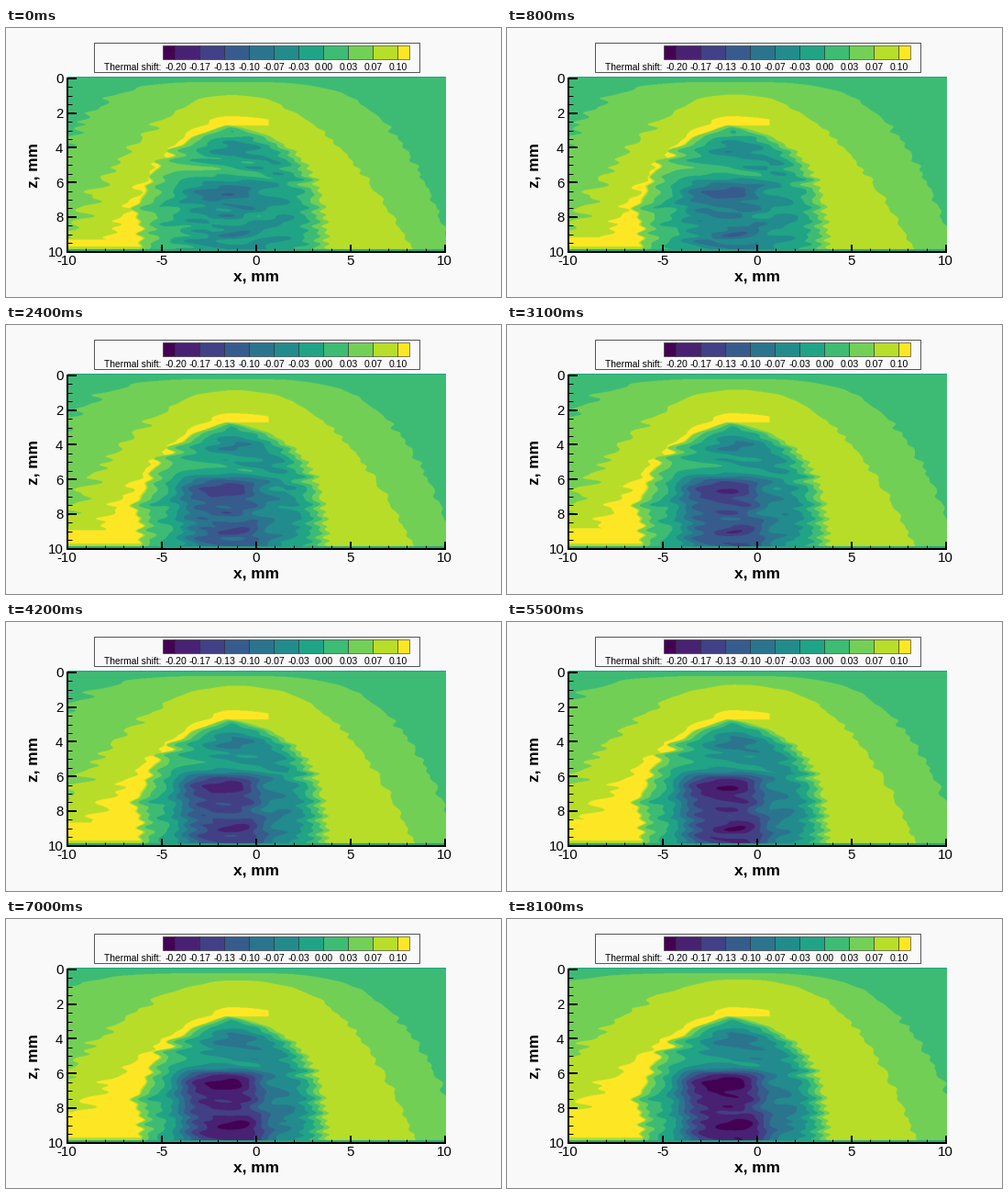
Recreate the animation shown at these times as a matplotlib script. Size 540 by 293 pixels, loop 8.2 s.

```python
import numpy as np
import matplotlib.pyplot as plt
from matplotlib.animation import FuncAnimation
from matplotlib.patches import Rectangle

W, H, DPI = 540, 293, 100
FRAMES, INTERVAL = 82, 100
LEFT, RIGHT, TOP, BOTTOM = 66.5, 479.5, 54, 243.5
PAPER = "#f9f9f9"
LEVELS = np.linspace(-0.2, 0.1, 10)
shade = np.linspace(0, 1, 11)
COLORS = plt.get_cmap("viridis")(shade - 0.07 * shade * (1 - shade))[:, :3]

plt.rcParams["font.family"] = "Liberation Sans"
fig = plt.figure(figsize=(W / DPI, H / DPI), dpi=DPI, facecolor=PAPER)
ax = fig.add_axes([0, 0, 1, 1])

X, Y = np.meshgrid(np.arange(LEFT, RIGHT, 0.5) + 0.25,
                   np.arange(TOP, BOTTOM, 0.5) + 0.25)
rng = np.random.default_rng(11)


def streaks(modes, long_wave, short_wave):
    """Smooth noise, drawn out along x, with unit variance."""
    total = np.zeros_like(X)
    for _ in range(modes):
        kx = 2 * np.pi / rng.uniform(*long_wave) * rng.choice([-1, 1])
        ky = 2 * np.pi / rng.uniform(*short_wave)
        total += np.cos(kx * X + ky * Y + rng.uniform(0, 2 * np.pi))
    return total * np.sqrt(2 / modes)


def bump(cx, cy, sx, sy):
    return np.exp(-((X - cx) / sx) ** 2 / 2 - ((Y - cy) / sy) ** 2 / 2)


def mix(a, b, u):
    return a + (b - a) * u


# Warm bands lie below arches whose sides follow power laws.
side = np.interp(X, [66, 150, 200, 479], [7, 4, 2, 1.6])
bent_x = X + side * streaks(14, (90, 260), (8, 22))


def arch(center, top, left, right):
    """Each side is (drop at 200 px from the center, exponent)."""
    reach = np.abs(bent_x - center) / 200
    return top + np.where(bent_x < center, left[0] * reach ** left[1],
                          right[0] * reach ** right[1])


# Cold core: saturating half widths, depth growing inwards from the rim.
below = np.clip(Y - 107, 0, None)
rim_jitter = 3.2 * streaks(10, (150, 400), (7, 16)) * np.clip(below / 35, 0, 1)
half_left = 94 * (1 - np.exp(-below / 28)) + 10 * np.exp(-((Y - 198) / 10) ** 2)
half_right = 112 * (1 - np.exp(-below / 36)) ** 0.7
core_left = 240 - half_left + rim_jitter
core_right = 240 + half_right + rim_jitter
inset = np.minimum(X - core_left, core_right - X)
in_core = (inset > 0) & (below > 0)
falloff = 1 - np.exp(-np.clip(inset, 0, None) / 20)

block_x = X - 233 - 0.12 * (Y - 200)
block = np.exp(-(block_x / 46) ** 4) / (1 + np.exp(-(Y - 167) / 2))
# Shape, strength at the start, strength at the end.
PARTS = [
    (np.ones_like(X), 0.07, 0.10),
    (bump(255, 132, 32, 10), 0.055, 0.06),
    (bump(297, 150, 18, 10), 0.04, 0.04),
    (bump(215, 156, 38, 6), -0.035, -0.005),
    (bump(240, 181, 33, 11), 0.055, 0.05),
    (bump(260, 228, 27, 9), 0.02, 0.05),
    (bump(312, 205, 24, 28), 0.04, 0.06),
    (block, 0.03, 0.14),
]
texture = 0.01 * streaks(16, (50, 150), (9, 26))
depth_start = sum(part * a for part, a, _ in PARTS) + texture * 1.2
depth_end = sum(part * b for part, _, b in PARTS) + texture * 0.8


def thermal_image(u):
    growth = (1 - np.exp(-1.6 * u)) / (1 - np.exp(-1.6))
    green = arch(240, 60, (mix(115, 15, u), 4), (mix(80, 63, u), 4))
    lime = arch(245, mix(74, 67, u), (mix(195, 112, u), 2),
                (172, mix(2.1, 3, u)))
    yellow = arch(245, 97, (mix(290, 138, growth), mix(1.9, 1.4, growth)),
                  (100, 2))
    yellow = np.minimum(yellow, mix(231, 208, u))

    band = np.full(X.shape, 7)
    band[Y > green] = 8
    band[Y > lime] = 9
    tail = (Y < 107) & (X < 286)
    flank = (X < core_left - 2) & (X < 240) & (Y < 238.5)
    band[(Y > yellow) & (tail | flank)] = 10
    core = np.digitize(0.067 - mix(depth_start, depth_end, growth) * falloff,
                       LEVELS)
    band = np.where(in_core, np.minimum(band, core), band)
    band[(Y < 55) | (Y > 241.5)] = 6
    return COLORS[band]


def line(x0, y0, x1, y1, width=1.0):
    ax.plot([x0, x1], [y0, y1], color="black", lw=width * 0.72,
            solid_capstyle="butt", zorder=3)


def label(x, y, text, size, **kw):
    kw = {"ha": "center", "va": "center_baseline", **kw}
    ax.text(x, y, text, fontsize=size * 0.72, zorder=4, **kw)


def draw_legend():
    ax.add_patch(Rectangle((95.5, 16), 355, 32, fc=PAPER, ec="#555555", lw=0.72))
    stops = [171, *(184.4 + 26.95 * np.arange(10)), 440.4]
    for x0, x1, color in zip(stops, stops[1:], COLORS):
        ax.add_patch(Rectangle((x0, 19), x1 - x0, 15, fc=color, ec="#222222", lw=0.4))
    label(107, 42, "Thermal shift:", 10.2, ha="left")
    for x, value in zip(stops[1:], LEVELS):
        label(x + 0.6, 42, f"{abs(value):.2f}" if value > -0.01 else f"{value:.2f}", 10.5)


def draw_axes():
    line(LEFT, TOP, LEFT, BOTTOM + 1, 2)
    line(LEFT - 1, BOTTOM, RIGHT, BOTTOM, 2)
    for x in range(-10, 11):
        px = mix(LEFT, RIGHT - 1, (x + 10) / 20)
        major = x % 5 == 0
        line(px, BOTTOM, px, BOTTOM - (8 if major else 4), 2 if major else 1)
        if major:
            label(px, 253, str(x), 15)
    for i in range(21):
        py = mix(TOP + 1, BOTTOM, i / 20)
        major = i % 4 == 0
        line(LEFT, py, LEFT + (10 if major else 5), py, 2 if major else 1)
        if major:
            label(62.5, py, str(i // 2), 15, ha="right")
    label(272.5, 270, "x, mm", 17.3, weight="bold")
    label(30, 150, "z, mm", 17.3, weight="bold", rotation=90, va="center")


picture = ax.imshow(thermal_image(0), extent=(LEFT, RIGHT, BOTTOM, TOP),
                    aspect="auto", zorder=1)
ax.set(xlim=(0, W), ylim=(H, 0))
ax.axis("off")
draw_legend()
draw_axes()


def update(frame):
    picture.set_data(thermal_image(frame / (FRAMES - 1)))
    return [picture]


anim = FuncAnimation(fig, update, frames=FRAMES, interval=INTERVAL,
                     repeat=True, repeat_delay=0, blit=False)
plt.show()
```
